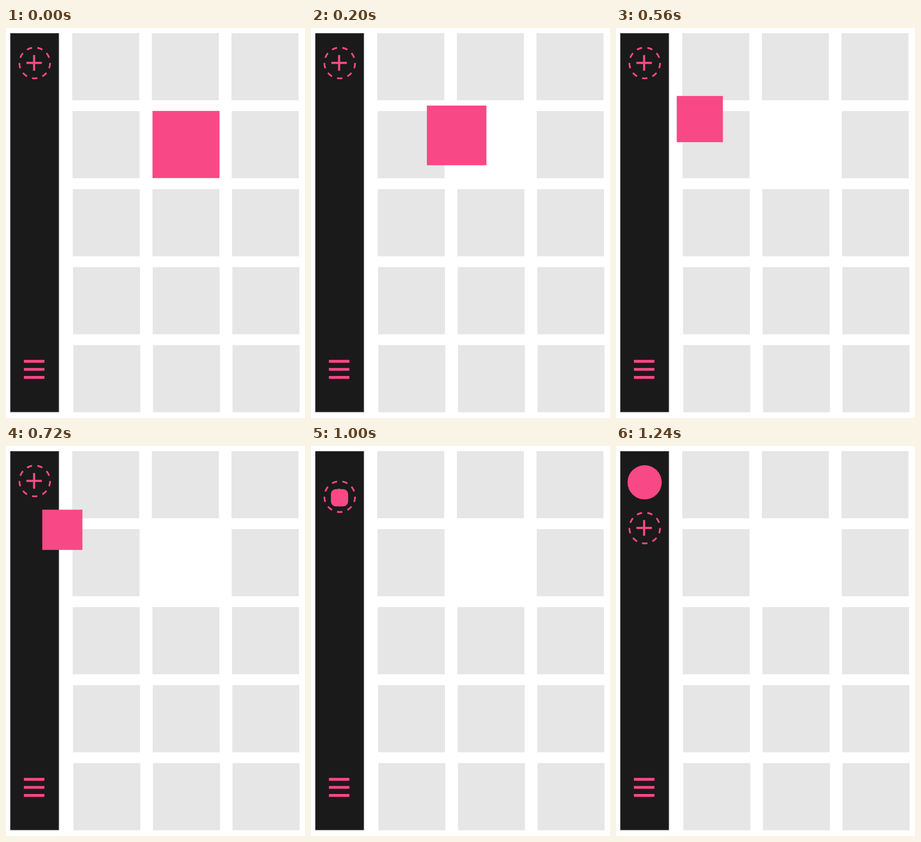
Animation, 656 px wide and 854 px high, one loop 1.6 s. Source, as an HTML page:

```html
<!DOCTYPE html>
<html lang="en">
<head>
<meta charset="utf-8">
<title>Drag to sidebar</title>
<style>
  html, body { margin: 0; width: 100%; height: 100%; overflow: hidden; background: #fff; }
  svg { display: block; }
  #card { fill: #f94886; }
  .line { fill: none; stroke: #f94886; }
</style>
</head>
<body>
<svg width="656" height="854" viewBox="0 0 656 854">
  <g id="tiles" fill="#e6e6e6"></g>
  <rect x="9.5" y="11.5" width="106.5" height="829.5" fill="#1a1a1a" stroke="#777"/>
  <path class="line" stroke-width="6.2" d="M39.3 729.8h45m-45 17.7h45m-45 17.7h45"/>
  <g id="add" class="line">
    <circle cx="63" cy="76.6" r="33.7" stroke-width="3.7" pathLength="18"
            stroke-dasharray="1" stroke-dashoffset=".5" transform="rotate(90 63 76.6)"/>
    <path stroke-width="4.7" d="M44.7 76.4h34M61.7 59.2v34.4"/>
  </g>
  <rect id="card"/>
</svg>
<script>
  const LOOP = 1600, STEP = 40;
  const TILE = 147, ROWS = 5, COLUMNS = 3;

  const byId = id => document.getElementById(id);
  const card = byId('card'), add = byId('add');
  const setAttrs = (el, attrs) => {
    for (const name in attrs) el.setAttribute(name, attrs[name]);
  };

  // The grid leans slightly to the right on its way down
  for (let row = 0; row < ROWS; row++) {
    for (let col = 0; col < COLUMNS; col++) {
      if (row === 1 && col === 1) continue; // slot of the moving card
      const tile = document.createElementNS('http://www.w3.org/2000/svg', 'rect');
      setAttrs(tile, {
        x: 145.3 + col * 174.7 + row * 0.6,
        y: 11.2 + row * 170.8,
        width: TILE,
        height: TILE
      });
      byId('tiles').append(tile);
    }
  }

  function draw(now) {
    const time = Math.floor((now % LOOP) / STEP) * STEP;
    const progress = (from, to) => Math.min(1, Math.max(0, (time - from) / (to - from)));

    const drag = progress(0, 880);
    const shrink = progress(880, 1080);
    const grow = progress(1080, 1240);
    const size = TILE - 72 * drag - 62 * shrink + 62 * grow;
    const centerX = 394.9 - 331.6 * drag - 1.2 * shrink + 0.7 * grow;
    const centerY = 255.1 - 87.5 * drag - 90.4 * shrink + 2.4 * grow;
    setAttrs(card, {
      x: centerX - size / 2,
      y: centerY - size / 2,
      width: size,
      height: size,
      rx: size * shrink / 2
    });

    add.setAttribute('transform', `translate(0 ${103 * progress(880, 1240)})`);
  }

  const start = performance.now();
  function tick() {
    draw(performance.now() - start);
    requestAnimationFrame(tick);
  }
  tick();
</script>
</body>
</html>
```
